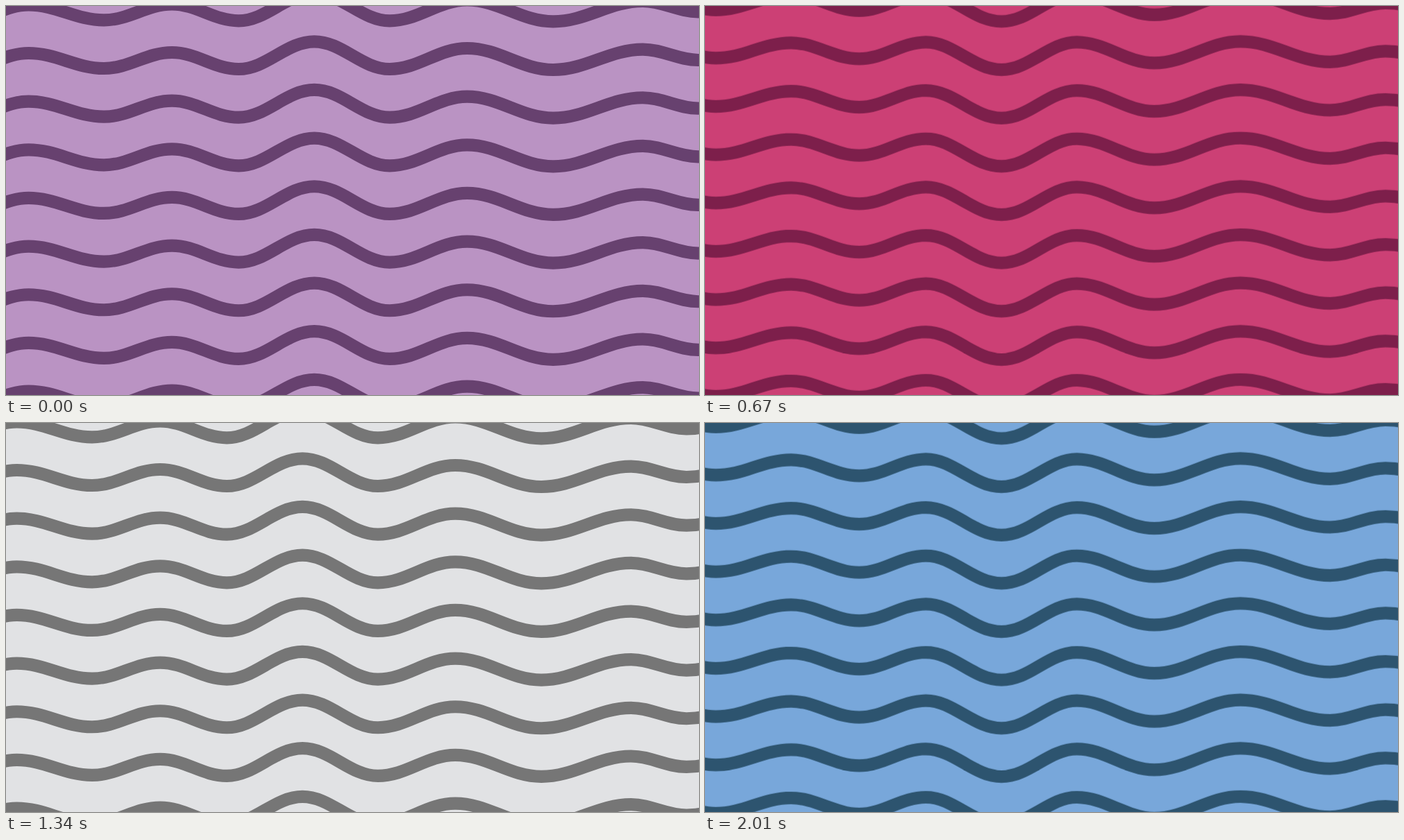
Recreate the animation shown at these times as an HTML page. Size 998 by 561 pixels, loop 2.68 s.

```html
<!DOCTYPE html>
<html lang="en">
<head>
<meta charset="utf-8">
<title>Waves</title>
<style>
  html, body { margin: 0; width: 100%; height: 100%; overflow: hidden; }
  svg { display: block; width: 998px; height: 561px; animation: tint 2680ms step-end infinite; }
  #waves {
    fill: none; stroke: currentColor; stroke-width: 18.2;
    transform-origin: 0 0;
    animation: pose 2680ms step-end infinite;
  }
  @keyframes tint {
    0%   { background: #ba93c3; color: #67416f; }
    25%  { background: #cc4075; color: #7d1f4b; }
    50%  { background: #e1e2e4; color: #767676; }
    75%  { background: #78a7da; color: #2d546f; }
    100% { background: #ba93c3; color: #67416f; }
  }
  /* The flipped poses mirror the whole stack of rows vertically. */
  @keyframes pose {
    0%       { transform: translate(17px, 0); }
    25%, 75% { transform: translate(0, 630.8px) scale(1, -1); }
    50%      { transform: none; }
    100%     { transform: translate(17px, 0); }
  }
</style>
</head>
<body>
<svg viewBox="0 0 998 561"><path id="waves"/></svg>
<script>
  const GAP = 69.65, EASE = 0.37;
  // Crests and troughs of one row
  const turns = [
    [-79, 91], [15.5, 68], [124, 90], [222, 67], [318, 91], [427, 51.3],
    [535.5, 91], [647, 61], [771, 92], [900, 62.6], [980, 78], [1085, 60]
  ];

  function wave(dy) {
    return turns.map(([x, y], i) => {
      y += dy;
      if (!i) return `M${x} ${y}`;
      const [px, py] = turns[i - 1], h = (x - px) * EASE;
      return `C${px + h} ${py + dy} ${x - h} ${y} ${x} ${y}`;
    }).join('');
  }

  let d = '';
  for (let row = -2; row <= 9; row++) d += wave(row * GAP);
  document.getElementById('waves').setAttribute('d', d);
</script>
</body>
</html>
```
